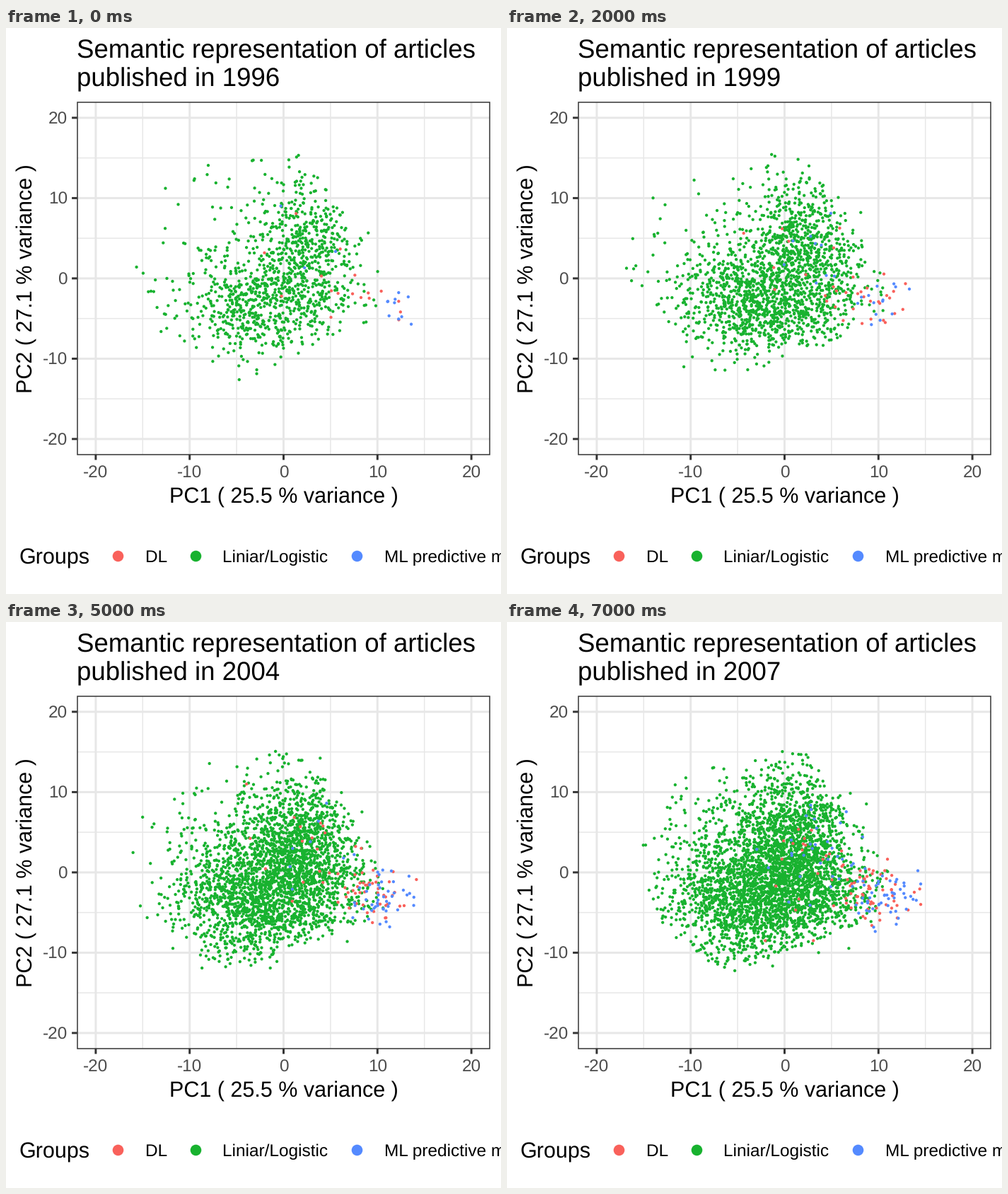
A matplotlib script that plays this animation: 700x800 px, repeating every 8000 ms.

```python
import numpy as np
import matplotlib.pyplot as plt
from matplotlib.animation import FuncAnimation
from matplotlib.patches import Rectangle

plt.rcParams["font.family"] = "Liberation Sans"
plt.rcParams["text.hinting"] = "none"

W, H, DPI = 700, 800, 200
PT = 72 / DPI  # points per pixel
STEPS = 8
RED, GREEN, BLUE = "#F9615B", "#18B22F", "#548AFF"
LEFT, RIGHT, TOP, BOTTOM = 100.7, 684.3, 104.8, 602.9


def year_at(k):
    return int(1996.5 + 1.6 * k)


def to_px(x, y):
    return 392.5 + 13.28 * x, 353.9 - 11.35 * y


def blend(rng, n, parts):
    """Sample a mixture of (weight, centre, spread) normal clouds."""
    weights, centres, spreads = (np.array(p) for p in zip(*parts))
    pick = rng.choice(len(parts), n, p=weights / weights.sum())
    return rng.normal(centres[pick], spreads[pick])


def green_cloud(rng, n, t):
    upper = (0.36 - 0.04 * t, (2.3 - 1.0 * t, 3.9 - 0.3 * t), (2.7 + 0.4 * t, 4.2 + 0.3 * t))
    lower = (0.38, (-3.7, -3.4), (3.5 + 0.5 * t, 3.2 + 0.7 * t))
    right = (0.09, (3.5, -2.5), (3.3, 2.7))
    wide = (0.17 + 0.07 * t, (-1.7, 0.8), (5.0 + 0.7 * t, 5.2 + 0.4 * t))
    pts = blend(rng, 2 * n, [upper, lower, right, wide])
    x, y = pts.T
    inside = ((x + 1.8) / 12) ** 2 + ((y - 1.3) / 13) ** 2 < 1.2
    inside &= y > -10.6 + 0.45 * (x + 1)
    inside &= y < 14 - 1.7 * (x - 3)
    # a few points may leak past the outline
    near = (abs(x + 1.5) < 12.5) & (y > -12) & (y < 15)
    inside |= near & (rng.random(2 * n) < 0.1)
    return pts[inside][:n]


def strays(rng, n):
    """Lone points along the upper, left and lower rim."""
    angle = np.radians(rng.uniform(75, 260, n))
    reach = rng.uniform(1.0, 1.24, n)
    return np.column_stack([-1.8 + 12.2 * reach * np.cos(angle),
                            1.3 + 12 * reach * np.sin(angle)])


def side_cloud(rng, n, centre):
    pts = blend(rng, n, [(0.64, centre, (2.0, 1.8)), (0.36, (3.2, 2.2), (3.2, 3.8))])
    return np.clip(pts, (-9, -8.5), (14.5, 11))


def make_points(k):
    rng = np.random.default_rng(year_at(k))
    t = k / (STEPS - 1)
    groups = [
        (GREEN, green_cloud(rng, 1130 + 335 * k, t)),
        (GREEN, strays(rng, 14)),
        (RED, side_cloud(rng, 17 + 9 * k, (9.2, -2.5))),
        (BLUE, side_cloud(rng, 13 + 3 * k + k * k, (10.3, -3))),
    ]
    offsets = np.column_stack(to_px(*np.vstack([pts for _, pts in groups]).T))
    return offsets, [color for color, pts in groups for _ in pts]


fig = plt.figure(figsize=(W / DPI, H / DPI), dpi=DPI, facecolor="white")
ax = fig.add_axes([0, 0, 1, 1])
ax.set_xlim(0, W)
ax.set_ylim(H, 0)
ax.axis("off")


def line(x0, y0, x1, y1, color, width, z):
    ax.plot([x0, x1], [y0, y1], color=color, lw=width * PT, zorder=z,
            solid_capstyle="butt", snap=False)


def label(x, y, text, size, color="black", ha="left", angle=0):
    return ax.text(x, y, text, fontsize=size, color=color, ha=ha, va="baseline",
                   rotation=angle, rotation_mode="anchor")


for v in range(-20, 21, 5):
    px, py = to_px(v, v)
    major = v % 10 == 0
    width, z = (2.96, 2) if major else (1.48, 1)
    line(px, TOP, px, BOTTOM, "#E7E7E7", width, z)
    line(LEFT, py, RIGHT, py, "#E7E7E7", width, z)
    if major:
        line(px, BOTTOM, px, BOTTOM + 7.6, "#333333", 2.96, 4)
        line(LEFT - 7.6, py, LEFT, py, "#333333", 2.96, 4)
        label(px, 635.6, str(v), 8.8, "#4D4D4D", "center")
        label(87, py + 8.8, str(v), 8.8, "#4D4D4D", "right")

ax.add_patch(Rectangle((LEFT, TOP), RIGHT - LEFT, BOTTOM - TOP, fill=False,
                       ec="#333333", lw=1.5 * PT, zorder=5))

label(100, 42.3, "Semantic representation of articles", 13.2)
title = label(100, 82, "", 13.2)
label(392.5, 670.6, "PC1 ( 25.5 % variance )", 11, ha="center")
label(37, 354, "PC2 ( 27.1 % variance )", 11, ha="center", angle=90)

label(18.3, 757.3, "Groups", 11)
legend = [(158.3, "DL", RED), (267.8, "Liniar/Logistic", GREEN),
          (496, "ML predictive models", BLUE)]
for x, name, color in legend:
    ax.scatter([x], [745.6], s=(15.6 * PT) ** 2, c=color, linewidths=0)
    label(x + 38.6, 755.2, name, 8.8)

dots = ax.scatter([], [], s=(4.3 * PT) ** 2, linewidths=0, zorder=3)
clouds = [make_points(k) for k in range(STEPS)]


def draw(k):
    offsets, colors = clouds[k]
    dots.set_offsets(offsets)
    dots.set_facecolor(colors)
    title.set_text(f"published in {year_at(k)}")
    return dots, title


anim = FuncAnimation(fig, draw, frames=STEPS, interval=1000,
                     repeat=True, repeat_delay=0, blit=False)
plt.show()
```
